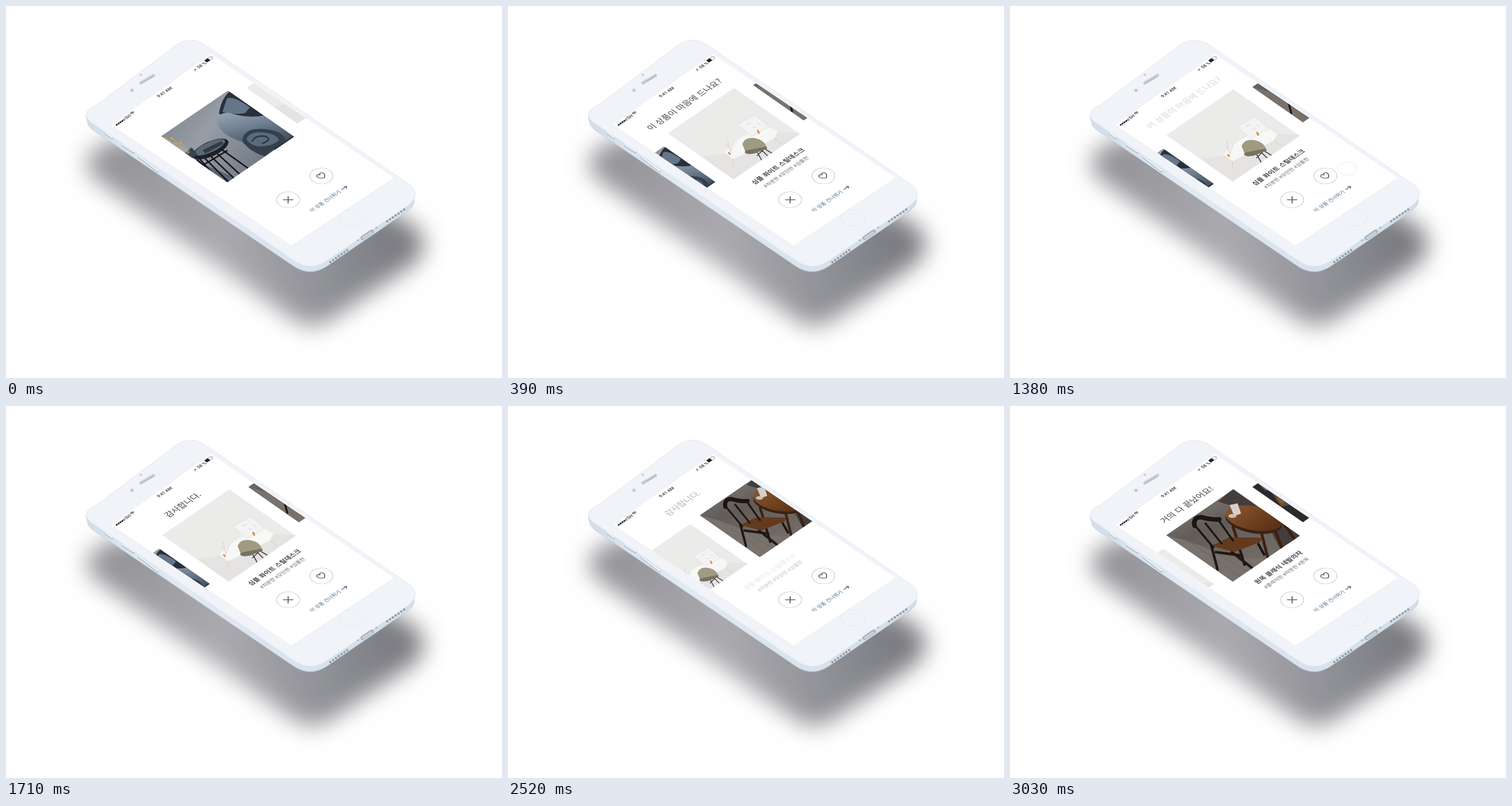
An HTML page that plays this animation: 864 px wide and 648 px high, repeating every 3.48 s.

```html
<!DOCTYPE html>
<html lang="ko">
<head>
<meta charset="utf-8">
<title>Product picker</title>
<style>
  html, body { margin: 0; width: 100%; height: 100%; overflow: hidden; background: #fff; }
  svg { display: block; width: 864px; height: 648px; }
  text { font-family: "Noto Sans CJK KR", "Noto Sans", sans-serif; text-anchor: middle; }
  .title { font-size: 20.4px; font-weight: 300; fill: #444; }
  .name { font-size: 15.4px; font-weight: 700; fill: #444; }
  .tags { font-size: 12.3px; fill: #666; }
  .status { font: 500 11px Roboto, sans-serif; fill: #333; }
  .line { fill: none; stroke-linecap: round; stroke-linejoin: round; }
</style>
</head>
<body>
<svg viewBox="0 0 864 648">
  <defs>
    <filter id="soft" x="-20%" y="-20%" width="140%" height="140%"><feGaussianBlur stdDeviation="20"/></filter>
    <linearGradient id="shade"><stop stop-color="#8e8e93"/><stop offset=".4" stop-color="#aaaaaf"/><stop offset=".7" stop-color="#919297"/><stop offset="1" stop-color="#727378"/></linearGradient>
    <linearGradient id="side"><stop stop-color="#d3deea"/><stop offset=".3" stop-color="#e2eaf2"/><stop offset=".65" stop-color="#d9e3ed"/><stop offset="1" stop-color="#d2dde7"/></linearGradient>
    <linearGradient id="front" x2="1" y2="1"><stop stop-color="#f1f3f8"/><stop offset="1" stop-color="#f0f3f8"/></linearGradient>
    <linearGradient id="wall" x2="1" y2=".5"><stop stop-color="#777f89"/><stop offset=".45" stop-color="#979da6"/><stop offset="1" stop-color="#6d7580"/></linearGradient>
    <linearGradient id="arm" x2=".5" y2="1"><stop stop-color="#98a5b3"/><stop offset=".45" stop-color="#718092"/><stop offset="1" stop-color="#3d4957"/></linearGradient>
    <linearGradient id="room" x2=".6" y2="1"><stop stop-color="#8f8985"/><stop offset=".45" stop-color="#625c58"/><stop offset="1" stop-color="#77706a"/></linearGradient>
    <linearGradient id="wood" x2="1" y2=".4"><stop stop-color="#8e5a30"/><stop offset="1" stop-color="#5d3317"/></linearGradient>
    <path id="screen" d="M184 207L357 84L675 299L497 417Z"/>
    <path id="square" d="M-116.500 -.5L.5 -80.500L116.500 .5L-.5 80.500Z"/>
    <clipPath id="screenClip"><use href="#screen"/></clipPath>
    <clipPath id="squareClip"><use href="#square"/></clipPath>
  </defs>

  <path filter="url(#soft)" fill="url(#shade)" d="M163 306Q120 274 163 244L330 180L704 378Q748 412 709 449L566 546Q532 570 498 544Z"/>

  <!-- body -->
  <path fill="url(#side)" d="M139 190Q139 210 160 222L502 454Q530 472 558 454L700 357Q714 347 712 328L400 130L158 172Z"/>
  <path class="line" stroke="#c1ceda" d="M142 206Q148 215 160 221.500L502 453.500Q530 471 558 453.500L700 356.500Q710 349 711.500 340"/>
  <path fill="url(#front)" stroke="#e3eaf2" d="M160 210Q120 188 158 172L296 68Q321 50 349 69L699 308Q726 326 702 346L558 444Q531 462 503 444Z"/>
  <g class="line">
    <path stroke="#aebccb" stroke-width="4" d="M173 222L184 230M204 243L222 255M232 263L264 288"/>
    <path stroke="#edf3f8" stroke-width="2.500" d="M173 221L184 229M204 242L222 254M232 262L264 287"/>
    <path stroke="#d3d6dd" stroke-width="6" d="M235 134L257 121"/>
    <path stroke="#b9bcc4" stroke-width="2.500" d="M235 134.500L257 121.500"/>
    <path stroke="#8f9aa8" stroke-width="4" stroke-dasharray="0 6" d="M565 446L596 424M664 375L696 353"/>
    <path stroke="#a5b0bf" stroke-width="7" d="M621 404L637 393"/>
    <path stroke="#c9d2dd" stroke-width="4" d="M622 404L636 394.500"/>
    <path stroke="#9aa5b4" stroke-width="3" d="M613 408h0M645 386h0"/>
    <ellipse cx="601" cy="369" rx="21" ry="14.500" stroke="#e0e4ea" stroke-dasharray="1 2"/>
  </g>
  <circle cx="219.500" cy="147" r="3" fill="#c6cad3"/>
  <circle cx="235" cy="120" r="2.200" fill="#cdd1d9"/>
  <use href="#screen" fill="#fff"/>

  <!-- status bar -->
  <path class="line" stroke="#333" stroke-width="3.600" stroke-dasharray="0 3.900" d="M193 207L206 198"/>
  <circle cx="206" cy="198" r="1.500" fill="#fff" stroke="#333" stroke-width=".7"/>
  <g data-at="212 193"><text class="status" y="4">SH</text></g>
  <g data-at="221 187" class="line" stroke="#333" stroke-width="1.500"><path d="M-5 -2Q0 -7 5 -2M-3 0Q0 -3 3 0M0 3h0"/></g>
  <g data-at="276 150"><text class="status" y="4">9:41 AM</text></g>
  <circle cx="329.500" cy="111" r="2" fill="#999"/>
  <g data-at="340.500 103"><text class="status" y="4">58 %</text></g>
  <g data-at="353 93"><rect x="-9" y="-4" width="18" height="8" rx="1.500" fill="#fff" stroke="#777"/><rect x="-9" y="-4" width="10" height="8" fill="#222"/><path d="M11 -2v4" stroke="#777"/></g>

  <g clip-path="url(#screenClip)">
    <g class="photo"><g clip-path="url(#squareClip)">
      <use href="#square" fill="url(#wall)"/>
      <g transform="translate(-385 -227)">
        <path fill="#596472" d="M260 240L325 268L400 300L385 320Z"/>
        <path fill="#28303b" d="M370 186Q374 160 390 147L505 225L470 250L425 248Z"/>
        <path fill="#65768a" d="M384 160Q397 156 424 176L416 186Q396 190 376 184Z"/>
        <path fill="url(#arm)" d="M366 202Q368 183 390 186Q420 196 450 190Q476 190 505 222L470 246Q424 254 410 236Q374 226 366 202Z"/>
        <path fill="#343f4c" d="M411 234Q413 212 446 214Q482 216 486 234L450 262Q420 252 411 234Z"/>
        <path fill="#5b6a7c" d="M418 232Q423 218 446 220Q472 222 475 234Q460 246 438 244Q424 242 418 232Z"/>
        <path class="line" stroke="#2b343f" stroke-width="2.500" d="M428 235Q434 224 452 227Q464 233 446 239"/>
        <path class="line" stroke="#11151a" stroke-width="2.600" d="M334 264L366 300M344 264L386 306M356 262L395 299M366 256L405 292M375 250L420 282M345 280L332 268M384 252L344 276"/>
        <ellipse cx="355" cy="249" rx="34" ry="13" transform="rotate(-24 355 249)" fill="#1d2127"/>
        <ellipse cx="354" cy="246" rx="29" ry="9" transform="rotate(-24 354 246)" fill="#5a6975"/>
        <path fill="#333c46" d="M341 251L374 235L378 240L346 257Z"/>
        <path fill="#36424d" d="M310 256L322 246L332 258L322 267Z"/>
        <path class="line" stroke="#c6b98d" d="M318 256L278 231M318 255L288 231M319 253L303 238M316 257L292 243"/>
        <path class="line" stroke="#e0a322" stroke-width="4.500" d="M277 231h0M287 230h0M303 238h0M294 240h0"/>
      </g>
    </g></g>

    <g class="photo"><g clip-path="url(#squareClip)">
      <use href="#square" fill="#ebebea"/>
      <g transform="translate(-389 -225)">
        <path fill="#e5e4e3" d="M335 266L385 258L462 222L512 224L388 312Z"/>
        <path fill="#f7f7f6" d="M372 258L402 232L448 212L466 222L460 234L388 270Z"/>
        <path fill="#f3f3f3" stroke="#dedede" d="M396 209L427 192L451 213L420 230Z"/>
        <path class="line" stroke="#cfcfcf" d="M411 209L418 206M423 214h5M431 207L436 210M388 270V284M460 234L474 244M384 259L378 236M383 257L389 242M381 250L374 243"/>
        <path class="line" stroke="#dd8945" stroke-width="3" d="M431 220L433 224M380 259L382 261"/>
        <path class="line" stroke="#444" stroke-width="1.700" d="M428 254L438 272M440 250L460 262M436 252L452 268M442 252L430 264"/>
        <path fill="#a09a82" d="M404 244Q408 231 425 233Q443 236 447 250L428 258Q410 264 407 251Z"/>
        <path fill="#777261" d="M410 255Q428 251 446 248L448 251L426 260Q411 263 408 258Z"/>
      </g>
    </g></g>

    <g class="photo"><g clip-path="url(#squareClip)">
      <use href="#square" fill="url(#room)"/>
      <g transform="translate(-388 -225)">
        <path fill="#79726c" d="M272 225L300 232L385 262L445 266L388 308Z"/>
        <path class="line" stroke="#69625d" d="M315 238L400 296M342 247L415 288M366 258L430 278"/>
        <path fill="#443d39" d="M388 143L506 226L470 248L440 190L362 166Z"/>
        <path class="line" stroke="#3b2113" stroke-width="5" d="M436 214L448 262M458 208L473 246M474 200L494 230M388 210L397 238"/>
        <ellipse cx="424" cy="199" rx="50" ry="22" transform="rotate(10 424 199)" fill="#3b2212"/>
        <ellipse cx="424" cy="195" rx="50" ry="21" transform="rotate(10 424 195)" fill="url(#wood)"/>
        <path fill="#d5d1ca" d="M382 172L396 169L402 187L390 191Z"/>
        <ellipse cx="387" cy="191" rx="7" ry="3.500" fill="#c9c0b4"/>
        <path class="line" stroke="#1f1713" stroke-width="4.500" d="M350 242L361 284M386 254L424 284M400 250L408 276M432 240L442 258M358 254L404 260"/>
        <path fill="#633a1d" d="M350 243L382 228L438 229L436 236L390 254Z"/>
        <path class="line" stroke="#1d1613" stroke-width="3.500" d="M322 208L354 246M340 204L368 239M364 200L388 234"/>
        <path class="line" stroke="#1b1513" stroke-width="8" d="M321 208Q318 194 332 193Q350 198 364 197"/>
      </g>
    </g></g>

    <g class="photo"><g clip-path="url(#squareClip)">
      <use href="#square" fill="#2a2a2c"/>
      <path fill="#5e4a38" d="M-75 8L-40 10L-20 38L-50 45Z"/>
      <path fill="#716d68" d="M-105 -10L-90 -18L-74 4L-85 8Z"/>
      <path fill="#855a2e" d="M-62 25L-44 16L-34 32L-50 38Z"/>
    </g></g>

    <g data-at="308 172">
      <text class="title" y="7.500">이 상품이 마음에 드나요?</text>
      <text class="title" y="7.500">감사합니다.</text>
      <text class="title" y="7.500">거의 다 끝났어요!</text>
    </g>
    <g data-at="467.500 281">
      <text class="name" y="5.800">심플 화이트 스틸데스크</text>
      <text class="name" y="5.800">원목 클래식 네발의자</text>
    </g>
    <g data-at="481.500 291">
      <text class="tags" y="4.500">#차분한 #모던한 #심플한</text>
      <text class="tags" y="4.500">#클래식한 #따뜻한 #원목</text>
    </g>

    <g data-at="491.500 337.500" class="line"><circle r="24.300" stroke="#ccc" stroke-width="1.500"/><path stroke="#666" stroke-width="2.400" d="M-7 -7L7 7M7 -7L-7 7"/></g>
    <g data-at="549.500 296" class="line"><circle r="24.300" stroke="#ccc" stroke-width="1.500"/><path stroke="#666" stroke-width="2.200" d="M0 8.500C-13 0 -9 -8 -4.500 -8Q-1 -8 0 -4.500Q1 -8 4.500 -8C9 -8 13 0 0 8.500Z"/></g>
    <g data-at="556 340"><text y="4.500" font-size="12.500" fill="#4a6b8c">이 상품 건너뛰기</text></g>
    <g data-at="589 317" class="line" stroke="#45678a" stroke-width="1.800"><path d="M-7 0H7M3 -4L7 0L3 4"/></g>
    <g id="tap"><g data-at="0 0"><circle r="20" fill="#fff" fill-opacity=".5" stroke="#bbb" stroke-width="1.200"/></g></g>
  </g>
</svg>
<script>
const LOOP = 3480;
const all = selector => [...document.querySelectorAll(selector)];
const photos = all('.photo');
const tap = document.getElementById('tap');

// Place flat artwork on the tilted screen plane.
for (const el of all('[data-at]'))
  el.setAttribute('transform', `matrix(.585 -.4 .58 .405 ${el.dataset.at})`);

const ease = (t, start, length) => {
  const x = Math.min(1, Math.max(0, (t - start) / length));
  return (1 - Math.cos(Math.PI * x)) / 2;
};

// [enter, enter length, leave, leave length]
const timing = {
  title: [[20, 430, 1200, 260], [1420, 290, 2250, 480], [2790, 240, LOOP, 1]],
  name: [[170, 340, 2250, 340], [2790, 240, LOOP, 1]],
  tags: [[170, 340, 2330, 350], [2790, 240, LOOP, 1]]
};

function drawText(kind, t) {
  all('.' + kind).forEach((el, i) => {
    const [enter, enterLength, leave, leaveLength] = timing[kind][i];
    const gone = ease(t, leave, leaveLength);
    const waiting = 1 - ease(t, enter, enterLength);
    const shift = kind === 'title' ? `0 ${-22 * waiting - 11 * gone}` : `${18 * waiting - 22 * gone} 0`;
    el.setAttribute('transform', `translate(${shift})`);
    el.setAttribute('opacity', ease(t, enter, enterLength * .45) * (1 - gone));
  });
}

function draw(t) {
  const page = ease(t, -45, 500) + ease(t, 2235, 515);
  photos.forEach((el, i) => {
    const slot = i - page;
    const scale = 1 - .24 * Math.min(1, Math.abs(slot));
    el.setAttribute('transform', `translate(${388.5 + 122 * slot} ${225.5 - 84 * slot}) scale(${scale})`);
  });
  Object.keys(timing).forEach(kind => drawText(kind, t));

  const near = ease(t, 640, 410) - ease(t, 1200, 320);
  tap.setAttribute('transform', `translate(${610 - 56 * near} ${275 + 21 * near})`);
  tap.setAttribute('opacity', ease(t, 640, 200) - ease(t, 1200, 300));
}

function tick() {
  draw(performance.now() % LOOP);
  requestAnimationFrame(tick);
}
tick();
</script>
</body>
</html>
```
